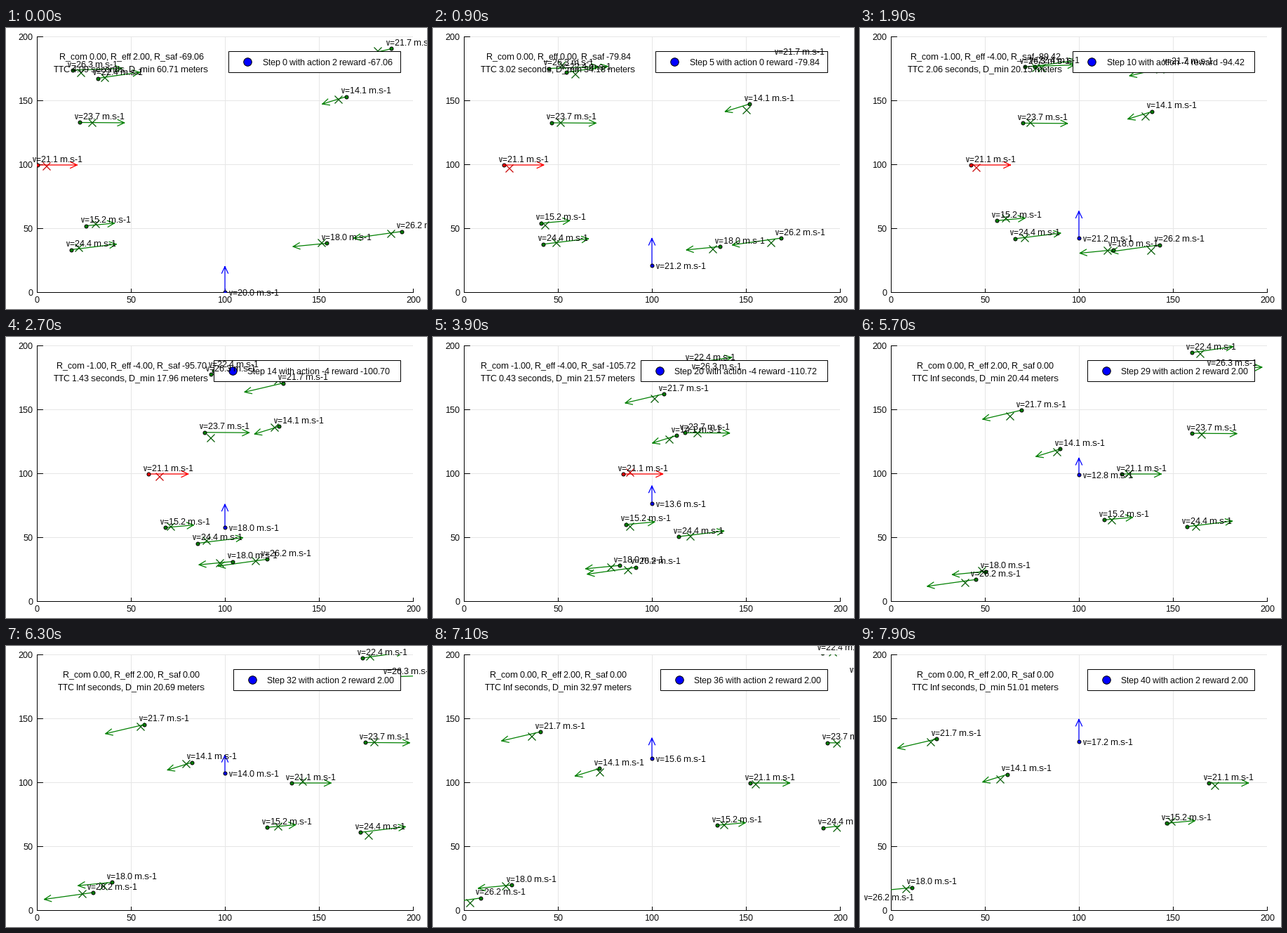
A matplotlib script for the animation above (8 s loop, 600 by 400 pixels).

```python
import numpy as np
import matplotlib
import matplotlib.pyplot as plt
from matplotlib.animation import FuncAnimation
from matplotlib.patches import Rectangle

matplotlib.rcParams["font.family"] = "Liberation Sans"
matplotlib.rcParams["text.hinting"] = "native"
matplotlib.rcParams["text.hinting_factor"] = 1  # whole-pixel letter spacing

PX = 0.72                      # points per pixel
SX, SY = 536 / 200, 364 / 200  # pixels per metre
DROP = 5 / SY                  # text centre to baseline
DT, RADIUS, NOISE = 0.2, 15.0, 1.5

# each car: start x, start y, speed, heading in degrees
CARS = np.array([
    (0.25, 99.45, 21.1, 0),
    (22.8, 132.7, 23.7, -0.6),
    (18.2, 33.2, 24.4, 10.2),
    (26.1, 51.9, 15.2, 7.6),
    (19.0, 173.6, 26.26, 3),
    (32.6, 167.3, 22.44, 12),
    (188.6, 190.4, 21.73, 199),
    (164.7, 153.0, 14.14, 204.5),
    (194.2, 47.5, 26.24, 191.6),
    (154.1, 38.2, 18.04, 188.2),
])
START, SPEED = CARS[:, :2], CARS[:, 2]
HEADING = np.radians(CARS[:, 3])
VEL = SPEED[:, None] * np.column_stack([np.cos(HEADING), np.sin(HEADING)])

# ego: speed up, hold, brake, hold, speed up
ACTIONS = np.repeat([2, 0, -4, -2, -4, -2, 0, 2], [3, 7, 9, 1, 1, 1, 6, 13])
EGO_V = 20 + DT * np.append(0, np.cumsum(ACTIONS))
EGO_Y = np.append(0, np.cumsum(DT * (EGO_V[:-1] + EGO_V[1:]) / 2))


def cars_at(step):
    return START + VEL * DT * step


def sense(step):
    """Noisy whole-metre readings of the next positions."""
    rng = np.random.default_rng(step)
    return np.round(cars_at(step + 1) + rng.normal(0, NOISE, START.shape))


def collision_time(p, v):
    """Time until relative position p, moving at v, is within RADIUS."""
    a, b, c = v @ v, p @ v, p @ p - RADIUS ** 2
    if c <= 0:
        return 0.0
    disc = b * b - a * c
    if disc < 0 or b >= 0:
        return np.inf
    return (-b - np.sqrt(disc)) / a


def measure(step):
    """Shortest collision time, the car it belongs to, least distance."""
    rel = cars_at(step + 1) - [100, EGO_Y[step + 1]]
    vel = VEL - [0, EGO_V[step + 1]]
    times = [collision_time(p, v) for p, v in zip(rel, vel)]
    return np.min(times), np.argmin(times), np.hypot(*rel.T).min()


fig = plt.figure(figsize=(6, 4), dpi=100, facecolor="white")
ax = fig.add_axes([44 / 600, 24 / 400, 536 / 600, 364 / 400])
ax.set(xlim=(0, 200), ylim=(0, 200))
ax.axis("off")


def write(x, y, text="", ha="center", z=9):
    return ax.text(x + 0.5 / SX, y - DROP, text, ha=ha, va="baseline",
                   fontsize=12 * PX, color="black", zorder=z)


def line(xs, ys, color, width=1.0, z=1, **kw):
    return ax.plot(xs, ys, color=color, lw=width * PX, zorder=z, **kw)[0]


def dot(color, size, z=4):
    return line([], [], color, z=z, marker="o", ls="", ms=size * PX,
                mec="black", mew=PX)


def cross():
    return line([], [], "#005a00", z=4, marker="x", ls="", ms=11 * PX,
                mew=1.25 * PX)


def arrow(color):
    return line([], [], color, 1.25, 3, solid_joinstyle="miter")


def aim(artist, pos, vel):
    """Lay an open-headed arrow from pos along vel."""
    scale = np.array([SX, SY])
    tip = pos + vel
    d = vel * scale / np.hypot(*(vel * scale))
    n = np.array([-d[1], d[0]])
    left, right = (tip + (s * 4.5 * n - 9.5 * d) / scale for s in (1, -1))
    gap = (np.nan, np.nan)
    artist.set_data(*np.array([pos, tip, gap, left, tip, right]).T)


# axes, grid and tick labels
line([0, 0, 200], [200, 0, 0], "black", z=2, clip_on=False)
for v in range(0, 201, 50):
    line([v, v], [0, 200], "#e6e6e6", z=0)
    line([0, 200], [v, v], "#e6e6e6", z=0)
    line([v, v], [0, 3], "black", z=2, clip_on=False)
    line([0, 3], [v, v], "black", z=2, clip_on=False)
    write(v, -10 / SY, str(v))
    write(-6 / SX, v, str(v), ha="right")

arrows = [arrow("green") for _ in CARS]
dots = [dot("green", 5) for _ in CARS]
marks = [cross() for _ in CARS]
labels = [write(0, 0, f"v={s:.1f} m.s-1") for s in SPEED]

ego_arrow, ego_dot, ego_label = arrow("blue"), dot("blue", 5), write(0, 0)
rewards, ranges = write(50, 185), write(50, 175)

box = Rectangle((0, 313 / SY), 1, 30 / SY, fc="white", ec="black", lw=PX,
                zorder=6)
ax.add_patch(box)
key_dot, key_text = dot("blue", 11.5, 7), write(0, 328 / SY, ha="left", z=8)


def draw(frame):
    step = (frame + 1) // 2
    action = ACTIONS[step]
    ttc, nearest, gap = measure(step)
    danger = np.isfinite(ttc)

    for i, (pos, obs) in enumerate(zip(cars_at(step), sense(step))):
        hot = danger and i == nearest
        aim(arrows[i], pos, VEL[i])
        arrows[i].set_color("red" if hot else "green")
        dots[i].set_data([pos[0]], [pos[1]])
        dots[i].set_markerfacecolor("red" if hot else "green")
        marks[i].set_data([obs[0]], [obs[1]])
        marks[i].set_markeredgecolor("#c80000" if hot else "#005a00")
        labels[i].set_position((pos[0] + 10.6, pos[1] + 5.2 - DROP))

    y, v = EGO_Y[step], EGO_V[step]
    aim(ego_arrow, np.array([100, y]), np.array([0, v]))
    ego_dot.set_data([100], [y])
    ego_label.set_position((115.6, y - DROP))
    ego_label.set_text(f"v={v:.1f} m.s-1")

    comfort = -1.0 if action < -2 else 0.0
    safety = 10 * ttc - 110 if danger else 0.0
    shown = f"{ttc:.2f}" if danger else "Inf"
    rewards.set_text(f"R_com {comfort:.2f}, R_eff {action:.2f}, "
                     f"R_saf {safety:.2f}")
    ranges.set_text(f"TTC {shown} seconds, D_min {gap:.2f} meters")

    text = (f"Step {step} with action {action} "
            f"reward {comfort + action + safety:.2f}")
    width = 7 * len(text) + 7
    left = 518 - width
    box.set_x(left / SX)
    box.set_width(width / SX)
    key_dot.set_data([(left + 27) / SX], [328 / SY])
    key_text.set_x((left + 48.5) / SX)
    key_text.set_text(text)
    return []


anim = FuncAnimation(fig, draw, frames=80, interval=100,
                     init_func=lambda: draw(0), repeat=True, blit=False)
plt.show()
```
